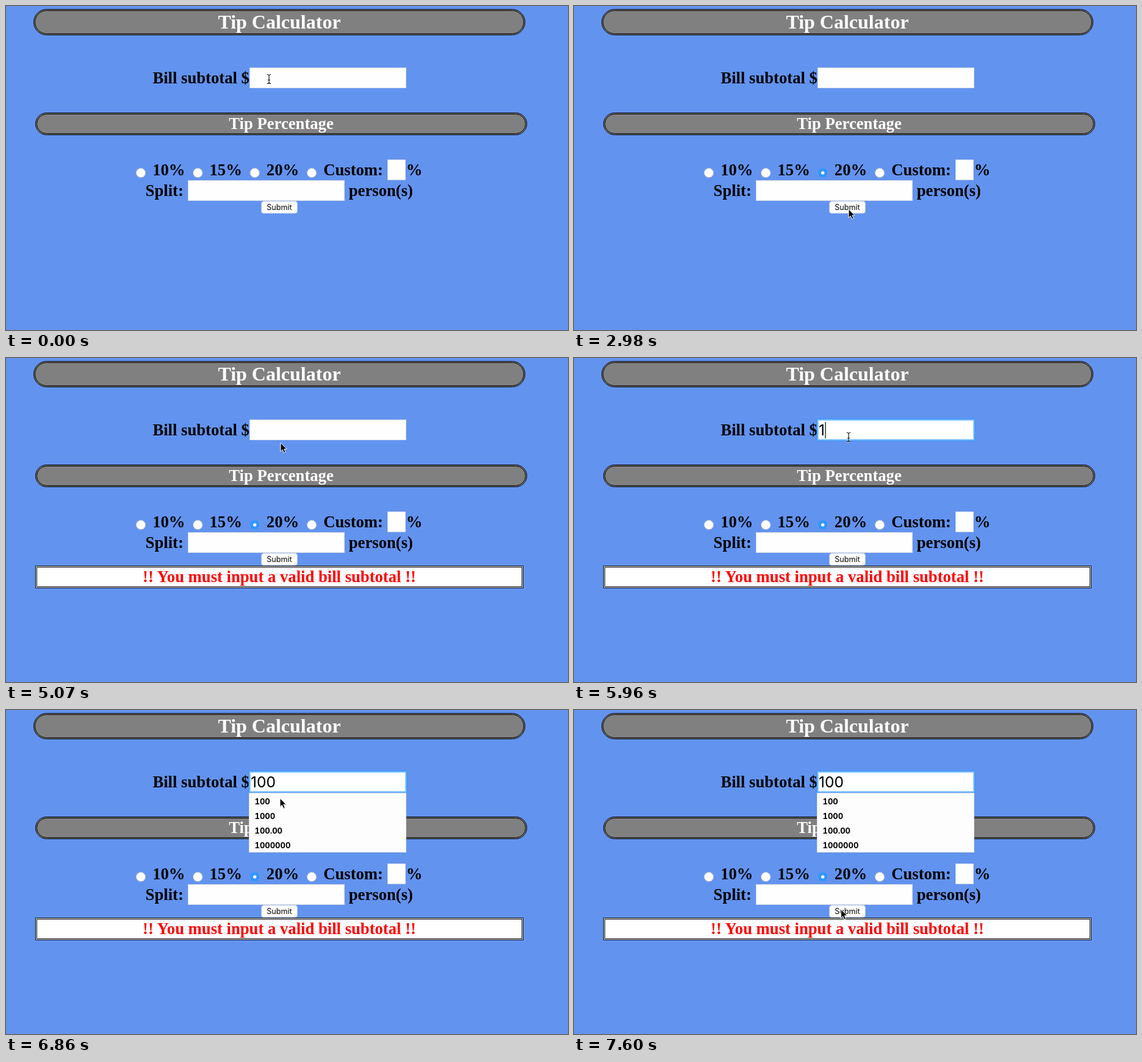
Write an HTML page that moves like this. It is 921 by 532 pixels and loops after 8 s.

```html
<!DOCTYPE html>
<html lang="en">
<head>
<meta charset="utf-8">
<title>Tip Calculator</title>
<style>
  html, body { margin: 0; width: 100%; height: 100%; overflow: hidden; background: #6293ef; }
  svg { display: block; width: 100%; height: 100%; }
  text { white-space: pre; }
  .serif { font: bold 26.667px "Liberation Serif", serif; }
  .title { font-size: 32px; }
  .mid { text-anchor: middle; }
  .sans { font: 12.6px Inter, sans-serif; }
  .value { font: 24.5px Inter, sans-serif; }
  .item { font: bold 13px Inter, sans-serif; font-variant-numeric: tabular-nums; }
</style>
</head>
<body>
<svg id="stage" viewBox="0 0 921 532"></svg>
<script>
const LOOP = 8000;
const stage = document.getElementById("stage");

function add(tag, attrs, parent = stage, text) {
  const el = document.createElementNS("http://www.w3.org/2000/svg", tag);
  for (const k in attrs) el.setAttribute(k, attrs[k]);
  if (text !== undefined) el.textContent = text;
  parent.appendChild(el);
  return el;
}
const group = () => add("g", {});
const label = (x, y, text, cls = "serif", fill = "#000", parent = stage) =>
  add("text", { x, y, class: cls, fill }, parent, text);
const box = (x, y, width, height, fill, stroke, parent = stage, rx = 0) =>
  add("rect", { x: x + .5, y: y + .5, width: width - 1, height: height - 1, rx, fill, stroke }, parent);
const show = (el, on) => el.setAttribute("visibility", on ? "visible" : "hidden");

// CSS-like "3px double" border
function panel(x, y, w, h, fill, rx = 0, parent = stage) {
  box(x, y, w, h, fill, "#000", parent, rx);
  box(x + 2, y + 2, w - 4, h - 4, fill, "#000", parent, Math.max(0, rx - 2));
}
const pill = (x, y, w, h) => panel(x, y, w, h, "#808080", (h - 1) / 2);
const field = (x, y, w) => box(x, y, w, 34, "#fefefe", "#d3d8e2");

// Static page
pill(45, 5, 806, 43);
label(448, 37, "Tip Calculator", "serif title mid", "#fff");
label(240.4, 127, "Bill subtotal $");
field(399, 101, 257);
pill(48, 175, 806, 37);
label(451, 202, "Tip Percentage", "serif mid", "#fff");

const radioX = i => 221 + i * 93.33;
["10%", "15%", "20%", "Custom:"].forEach((name, i) => {
  add("circle", { cx: radioX(i), cy: 274, r: 7.6, fill: "#fefefe", stroke: "#c3c8d2", "stroke-width": .8 });
  label(radioX(i) + 19.2, 278, name);
});
field(625, 252, 30);
label(655.8, 278, "%");
label(228.6, 312, "Split:");
field(298, 286, 257);
label(561.8, 312, "person(s)");
box(418, 320, 60, 21, "#fff", "#a9c2f0", stage, 4);
label(448, 335, "Submit", "sans mid");

// Changing parts
const picked = group();
add("circle", { cx: radioX(2), cy: 274, r: 8, fill: "#3194fc" }, picked);
add("circle", { cx: radioX(2), cy: 274, r: 2.7, fill: "#fff" }, picked);

const error = group();
panel(48, 341, 800, 37, "#fff", 0, error);
label(448, 368, "!! You must input a valid bill subtotal !!", "serif mid", "#f00", error);

const focus = group();
add("rect", { x: 398.5, y: 100.5, width: 258, height: 35, rx: 2, fill: "none", stroke: "#3b99fc", "stroke-width": 3, opacity: .6 }, focus);
add("rect", { x: 400, y: 102, width: 255, height: 32, fill: "#fff", stroke: "#8ccbff", "stroke-width": 2 }, focus);

const value = label(401, 127, "", "value");
const caret = add("rect", { y: 105, width: 1.2, height: 27, fill: "#000" });

const list = group();
const sheet = box(398, 136, 258, 146, "#fdfdfd", "#dde2ec", list);
const items = Array.from({ length: 6 }, (_, i) => label(407.5, 154.5 + i * 24, "", "item", "#000", list));

const arrow = group();
const arrowPath = "M0 0V14.2L3.2 11.2 5.6 16.6 8.1 15.5 5.8 10.2H10.2Z";
add("path", { d: arrowPath, transform: "translate(.6 1.2)", fill: "#000", opacity: .25 }, arrow);
add("path", { d: arrowPath, fill: "#000", stroke: "#fff", "stroke-width": 1 }, arrow);

const beam = group();
const beamPath = "M-3.2-7.5Q-.5-7.5 0-6Q.5-7.5 3.2-7.5M0-6V6M-3.2 7.5Q-.5 7.5 0 6Q.5 7.5 3.2 7.5M-1.8 1.5H1.8";
add("path", { d: beamPath, fill: "none", stroke: "#fff", "stroke-width": 2.4, opacity: .7 }, beam);
add("path", { d: beamPath, fill: "none", stroke: "#000", "stroke-width": 1.1 }, beam);

// The pointer glides between a few places, redrawn every STEP ms
const STEP = 143;
const moves = [
  { at: 900, dur: 850, x: 401, y: 277 },
  { at: 2550, dur: 570, x: 450, y: 333.5 },
  { at: 4620, dur: 657, x: 450, y: 130 },
  { at: 6860, dur: 850, x: 437.5, y: 327.5 }
];
const ease = k => k * k * (3 - 2 * k);

function pointer(t) {
  let x = 431, y = 120;
  for (const m of moves) {
    if (t < m.at) break;
    const steps = Math.floor((t - m.at) / STEP) + 1;
    const k = ease(Math.min(1, steps * STEP / m.dur));
    x += (m.x - x) * k;
    y += (m.y - y) * k;
  }
  return { x, y, overField: x > 399 && x < 656 && y > 101 && y < 135 };
}

const CLICK = 450, BLUR = 1950, PICK = 2100, SUBMIT = 4030, REFOCUS = 5370;
const TYPE = 5960, KEY = 150, LIST = TYPE + KEY, LEAVE = 6860, BLINK = 525;
const history = ["100", "15", "1000", "10", "100.00", "1000000"];

function draw(t) {
  const focused = t >= CLICK && t < BLUR || t >= REFOCUS;
  show(focus, focused);
  show(picked, t >= PICK);
  show(error, t >= SUBMIT);

  const typed = t < TYPE ? "" : "100".slice(0, Math.max(1, Math.floor((t - TYPE) / KEY)));
  value.textContent = typed;
  const active = t < REFOCUS ? CLICK : t < TYPE ? REFOCUS : TYPE + KEY * typed.length;
  caret.setAttribute("x", typed ? 401.5 + value.getComputedTextLength() : 402);
  show(caret, focused && t < LEAVE && (t - active) % (2 * BLINK) < BLINK);

  const hits = t < LIST ? [] : history.filter(s => s.startsWith(typed));
  show(list, hits.length > 0);
  sheet.setAttribute("height", hits.length * 24 + 1);
  items.forEach((el, i) => { el.textContent = hits[i] || ""; });

  const { x, y, overField } = pointer(t);
  show(arrow, !overField);
  show(beam, overField);
  (overField ? beam : arrow).setAttribute("transform", `translate(${x} ${y})`);
}

const start = performance.now();
function tick() {
  draw((performance.now() - start) % LOOP);
  requestAnimationFrame(tick);
}
tick();
</script>
</body>
</html>
```
